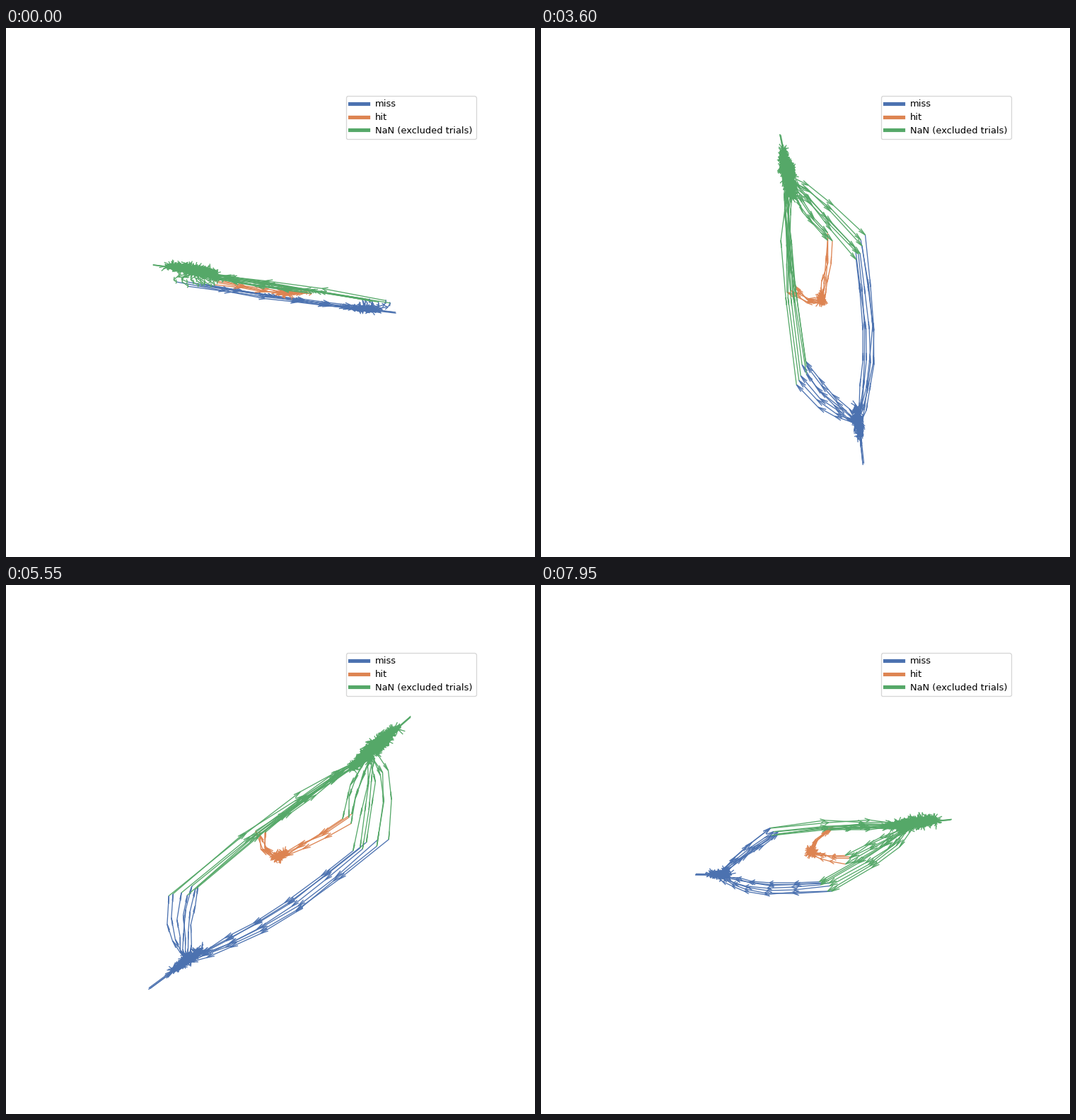
Write a matplotlib script that moves like this. It is 748 by 748 pixels and loops after 8000 ms.

```python
import numpy as np
import matplotlib.pyplot as plt
from matplotlib.animation import FuncAnimation
from matplotlib.collections import LineCollection
from matplotlib.lines import Line2D

SIZE, DPI = 748, 93.5
CX, CY, FOCAL = 391.1, 370.0, 3113.0   # rotation axis and camera distance in pixels
ELEV, STEP_DEG, HOLD = np.radians(30), 5, 3
HEAD, HEAD_ANGLE = 11.5, np.radians(15)
COLORS = {"b": "#4C72B0", "o": "#DD8452", "g": "#55A868"}
LABELS = {"b": "miss", "o": "hit", "g": "NaN (excluded trials)"}
rng = np.random.default_rng(4)


def camera(step):
    """Right, up and towards-the-eye unit vectors."""
    az = np.radians(STEP_DEG * step)
    c, s, ce, se = np.cos(az), np.sin(az), np.cos(ELEV), np.sin(ELEV)
    return (np.array([-s, c, 0]), np.array([-se * c, -se * s, ce]),
            np.array([ce * c, ce * s, se]))


def project(points, step):
    right, up, eye = camera(step)
    scale = FOCAL / (FOCAL - points @ eye)
    return np.stack([CX + points @ right * scale, CY - points @ up * scale], -1)


SIDE, FRONT = camera(45), camera(24)
FLAT_RIGHT, FLAT_UP, _ = camera(0)
NORMAL = 0.213 * FLAT_RIGHT + 0.977 * FLAT_UP   # all loops lie close to one plane


def locate(x_side, y_side, x_front):
    """Space point from its place in the side view and its x in the front view."""
    offsets = np.array([x_side - CX, CY - y_side, x_front - CX])
    axes = np.array([SIDE[0], SIDE[1], FRONT[0]])
    eyes = np.array([SIDE[2], SIDE[2], FRONT[2]])
    return np.linalg.solve(FOCAL * axes + offsets[:, None] * eyes, FOCAL * offsets)


def scatter(size, count):
    """Bounded random offsets, flattened towards the common plane."""
    v = np.clip(rng.normal(0, 1, (count, 3)), -1.7, 1.7) * size
    return v - 0.55 * np.outer(v @ NORMAL, NORMAL)


def bend(start, control, end, k):
    k = k[:, None]
    return (1 - k) ** 2 * start + 2 * k * (1 - k) * control + k ** 2 * end


arrows = {key: [] for key in COLORS}


def add_path(key, points):
    arrows[key].extend(zip(points, points[1:]))


def add_loop(keys, nodes, hub, scales, legs, ease, noise):
    """Lines speeding up to a corner, then slowing down into the next cluster."""
    for scale in scales:
        start, out, corner, back, end = nodes + scatter(noise, 5)
        out, corner, back = (hub + (p - hub) * scale for p in (out, corner, back))
        leave, arrive = (np.linspace(0, 1, n + 1) for n in legs)
        first = bend(start, out, corner, leave ** ease[0])
        second = bend(corner, back, end, 1 - (1 - arrive) ** ease[1])
        for key, path in zip(keys, (first, second)):
            path[1:-1] += scatter(1.8, len(path) - 2)
            add_path(key, path)


def add_cluster(key, inner, outer, count, width, hop, reach):
    """Short hops inside a spindle, with a few stray starts beyond its outer end."""
    axis = outer - inner
    t = rng.beta(1.6, 1.6, (count, 1))
    ends = []
    for s in (t, np.clip(t + rng.normal(0, hop, t.shape), 0, 1)):
        ends.append(inner + axis * s + scatter(width * (0.4 + 0.6 * np.sin(np.pi * s)), count))
    arrows[key].extend(zip(*ends))
    if reach:
        for offset in scatter(1.5, 3):
            add_path(key, [outer + axis * reach + offset, outer - axis * 0.05 + offset])


GREEN, BLUE, ORANGE = locate(558, 288, 350), locate(212, 469, 449), locate(380, 381, 396)
BIG_HUB, SMALL_HUB = locate(385, 382, 405), locate(430, 345, 385)

descent = [GREEN, locate(550, 330, 384), locate(481, 408, 453), locate(322, 470, 479), BLUE]
ascent = [BLUE, locate(222, 430, 408), locate(262, 382, 367), locate(420, 318, 342), GREEN]
hit_in = [GREEN, locate(515, 322, 372), locate(480, 361, 404), locate(425, 381, 407), ORANGE]
hit_out = [ORANGE, locate(366, 366, 376), locate(384, 343, 358), locate(450, 320, 345), GREEN]

add_loop("gb", descent, BIG_HUB, np.linspace(0.8, 1.2, 7), (4, 6), (1.4, 1.4), 4)
add_loop("bg", ascent, BIG_HUB, np.linspace(0.85, 1.14, 7), (4, 5), (1.3, 2), 3.5)
add_loop("go", hit_in, SMALL_HUB, np.linspace(0.85, 1.15, 4), (4, 4), (1.3, 1.6), 4)
add_loop("og", hit_out, SMALL_HUB, np.linspace(0.9, 1.1, 5), (2, 5), (1, 1.5), 4)

add_cluster("g", locate(522, 298, 356), locate(606, 266, 342), 420, 6.5, 0.08, 0.3)
add_cluster("b", locate(236, 462, 446), locate(189, 476, 451), 110, 4.5, 0.15, 0.7)
add_cluster("o", locate(390, 381, 398), locate(373, 380, 395), 40, 3.5, 0.2, 0)


def strokes(pairs):
    """Shaft and two head strokes per arrow; heads lie in the upright plane."""
    start, tip = np.array(pairs).swapaxes(0, 1)
    d = tip - start
    d /= np.linalg.norm(d, axis=1, keepdims=True)
    level = np.stack([d[:, 1], -d[:, 0], 0 * d[:, 0]], 1)
    level /= np.linalg.norm(level, axis=1, keepdims=True)
    side = np.cross(level, d) * np.sin(HEAD_ANGLE)
    barbs = [tip - HEAD * (d * np.cos(HEAD_ANGLE) + sign * side) for sign in (1, -1)]
    return np.concatenate([np.stack([p, tip], 1) for p in (start, *barbs)])


fig = plt.figure(figsize=(SIZE / DPI, SIZE / DPI), dpi=DPI, facecolor="white")
ax = fig.add_axes([0, 0, 1, 1])
ax.set(xlim=(0, SIZE), ylim=(SIZE, 0))
ax.axis("off")

shapes = {key: strokes(pairs) for key, pairs in arrows.items()}
layers = {key: ax.add_collection(LineCollection([], colors=color, linewidths=1), autolim=False)
          for key, color in COLORS.items()}
handles = [Line2D([], [], color=COLORS[key], lw=4, label=LABELS[key]) for key in COLORS]
ax.legend(handles=handles, loc="upper right", labelspacing=0.445,
          bbox_to_anchor=(671.4 / SIZE, 1 - 89.7 / SIZE),
          prop={"family": "DejaVu Sans", "size": 10})


def update(frame):
    for key, layer in layers.items():
        layer.set_segments(project(shapes[key], frame // HOLD))
    return list(layers.values())


anim = FuncAnimation(fig, update, frames=160, interval=50, repeat=True, repeat_delay=0)
plt.show()
```
